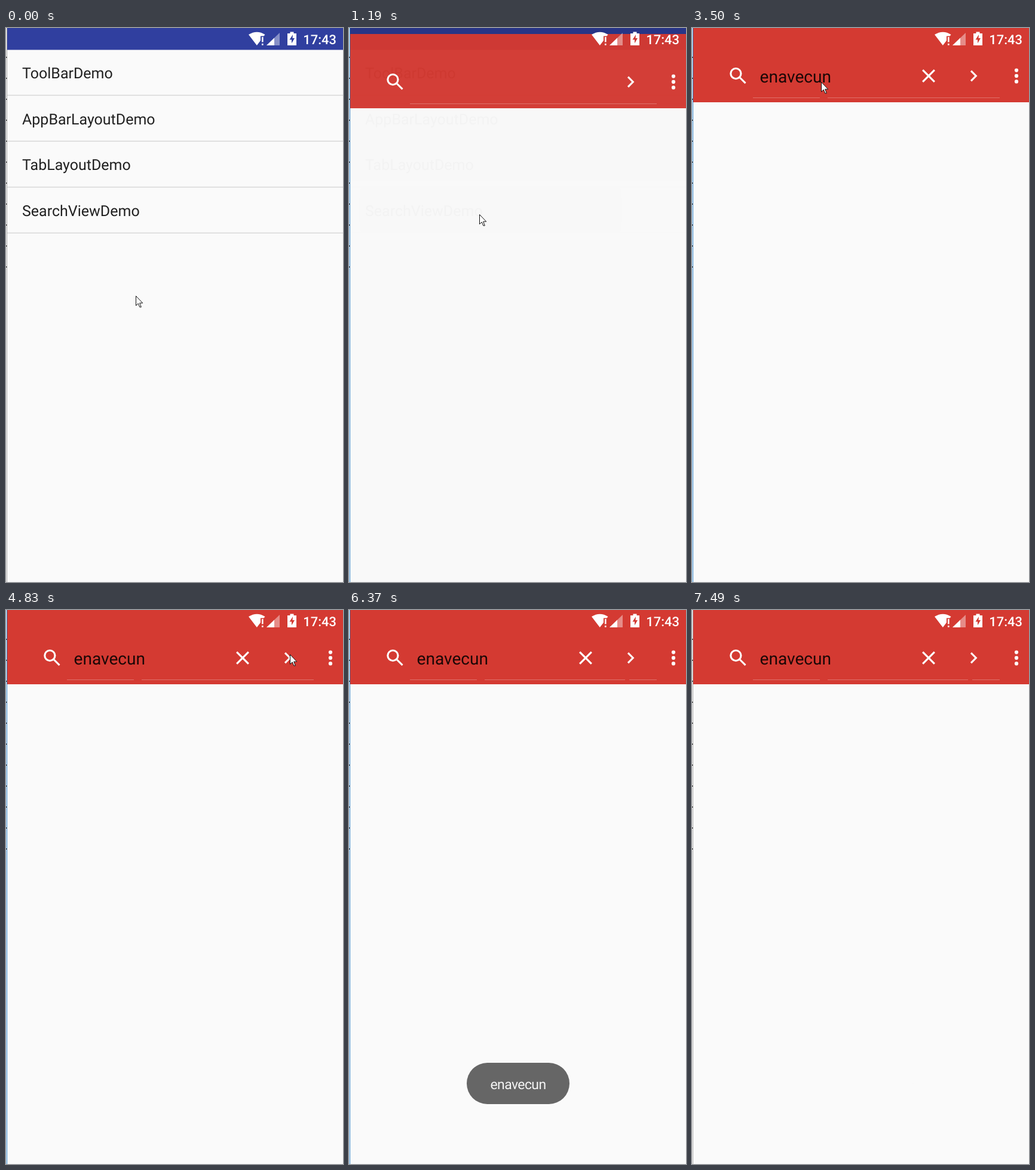
These frames come from a looping animation (564x925 px, 7560 ms). An HTML page:

```html
<!DOCTYPE html>
<html lang="en">
<head>
<meta charset="utf-8">
<title>Search view</title>
<style>
  html, body { margin: 0; width: 100%; height: 100%; overflow: hidden; background: #fafafa; }
  svg { display: block; width: 100%; height: 100%; }
  text { font-family: Roboto, "Noto Sans", sans-serif; text-rendering: geometricPrecision; }
  .row { font-size: 25px; fill: #212121; }
  .query { font-size: 28.1px; fill: #000; fill-opacity: .87; }
  .clock { font-size: 21.9px; font-weight: 500; fill: #fff; }
  .toast { font-size: 23px; letter-spacing: -.6px; fill: #f4f4f4; text-anchor: middle; }
  .icon { fill: none; stroke: #fff; stroke-width: 2; }
  #more { stroke-width: 4; stroke-linecap: round; }
</style>
</head>
<body>
<svg viewBox="0 0 564 925" preserveAspectRatio="none">
  <defs>
    <clipPath id="rowClip"><rect x="2" y="266" width="562" height="76"/></clipPath>
  </defs>

  <g id="menu">
    <rect width="564" height="925" fill="#fafafa"/>
    <rect width="564" height="36.5" fill="#303f9f"/>
    <circle id="ripple" cy="304" clip-path="url(#rowClip)" fill="#000" fill-opacity=".12"/>
    <g id="rows"></g>
    <rect id="dim" width="564" height="925" fill="#000"/>
  </g>

  <g id="search">
    <rect width="564" height="935" fill="#fafafa"/>
    <rect width="564" height="124" fill="#d43a32"/>
    <g id="icons"></g>
    <rect x="102" y="116" width="413" height="1" fill="#df7069"/>
    <rect id="gapLeft" x="214" y="115" width="13" height="3" fill="#d43a32"/>
    <rect id="gapRight" x="462" y="115" width="7" height="3" fill="#d43a32"/>
    <text id="query" class="query" x="113.5" y="91"></text>
  </g>

  <g id="status" fill="#fff">
    <path d="M406 11Q420 2.5 433.5 11L431.5 13.5H426V21L419.8 29Z"/>
    <path d="M428 15h2.6v8.5H428zM428 26h2.6v2.7H428z"/>
    <path d="M436 29 458 8V29Z" fill-opacity=".42"/>
    <path d="M436 29 449 16.6V29Z"/>
    <path fill-rule="evenodd" d="M471 9h4.5V6.5h6V9h4.5V29H471ZM480 11 474.5 19.5H478V25.5L483 17H479.5Z"/>
    <text class="clock" x="497.3" y="26.7">17:43</text>
  </g>

  <g id="toast">
    <rect x="197" y="756" width="172" height="69" rx="34.5" fill="#666"/>
    <text class="toast" id="toastText" x="283" y="800"></text>
  </g>

  <rect width="1" height="925" fill="#fff"/>
  <rect id="edge" x="1" width="1" height="925"/>
  <g id="marks"></g>

  <path id="pointer" d="M.5 .5V16.5L4.2 13 6.8 19H9.3L6.7 12.2H11.7Z" fill="#fff" stroke="#111"/>
</svg>

<script>
  const LOOP = 7560, STEP = 70;
  const WORD = "enavecun";
  const TYPE_START = 2520, TYPE_GAP = 140;
  const TAP = 490, OPEN = 1075, OPENED = 1260, LEAVE = 6370;
  const ROWS = ["ToolBarDemo", "AppBarLayoutDemo", "TabLayoutDemo", "SearchViewDemo"];

  // Pointer moves; sway bends the path sideways in half waves
  const MOVES = [
    { from: 0, to: 420, x: 217, y: 319 },
    { from: 1120, to: 1750, x: 216, y: 90, sway: 6, waves: 2 },
    { from: 4200, to: 4550, x: 484, y: 74 },
    { from: 4690, to: 4830, x: 475, y: 74 },
    { from: 5040, to: 5600, x: 468, y: 87 },
    { from: 5600, to: LEAVE, x: 540, y: 870, sway: -48, waves: 1 }
  ];

  const el = id => document.getElementById(id);
  const show = (id, on) => el(id).setAttribute("visibility", on ? "visible" : "hidden");
  const set = (id, attrs) => {
    for (const key in attrs) el(id).setAttribute(key, attrs[key]);
  };
  const part = (t, from, to) => Math.min(1, Math.max(0, (t - from) / (to - from)));
  const smooth = k => k * k * (3 - 2 * k);

  const icon = (id, x, d) =>
    `<path id="${id}" class="icon" transform="translate(${x} 80) scale(1.563) translate(-12 -12)" d="${d}"/>`;

  el("icons").innerHTML =
    icon("find", 77.3, "M4 9.5a5.5 5.5 0 0 1 11 0a5.5 5.5 0 0 1-11 0zM13.6 13.6 19.8 19.8") +
    icon("clear", 396, "M5.7 5.7 18.3 18.3M18.3 5.7 5.7 18.3") +
    icon("go", 471.2, "M9.3 6.7 14.6 12 9.3 17.3") +
    icon("more", 543, "M12 6h0M12 12h0M12 18h0");

  el("rows").innerHTML = ROWS.map((name, i) => {
    const y = i * 76.65;
    return `<text class="row" x="27" y="${84 + y}">${name}</text>` +
      `<rect x="2" y="${111.6 + y}" width="562" height="1.5" fill="#d8d8d8"/>`;
  }).join("");

  // Slivers of text showing at the left edge
  for (let y = 48; y < 400; y += 35) {
    el("marks").innerHTML += `<rect y="${y}" width="1.5" height="2" fill="#444"/>`;
  }
  el("toastText").textContent = WORD;

  function pointerAt(t) {
    let x = 217, y = 447;
    for (const { from, to, x: toX, y: toY, sway = 0, waves = 0 } of MOVES) {
      const k = smooth(part(t, from, to));
      x += (toX - x) * k + sway * Math.sin(waves * Math.PI * k);
      y += (toY - y) * k;
    }
    return `${Math.round(x)} ${Math.round(y)}`;
  }

  function draw(t) {
    const press = part(t, TAP, OPEN + 115);
    set("ripple", { cx: 217 + 20 * press, r: 220 * press });

    // Search screen slides up while fading in
    const opened = t >= OPENED;
    const slide = opened ? 1 : part(t, OPEN, OPEN + 350);
    const fade = opened ? 1 : part(t, OPEN, OPEN + 200);
    set("search", {
      transform: `translate(0 ${Math.round(74 * (1 - slide) ** 5)})`,
      opacity: 1 - (1 - fade) ** 4
    });
    set("dim", { opacity: .16 * part(t, OPEN, OPEN + 100) });

    const typed = Math.max(0, Math.floor((t - TYPE_START) / TYPE_GAP) + 1);
    el("query").textContent = WORD.slice(0, typed);
    show("clear", typed > 0);
    show("gapLeft", t >= 1610);
    show("gapRight", t >= 5670);

    set("toast", { opacity: part(t, 5040, 5390) * (1 - part(t, 6790, 7280)) });

    const idle = t < TAP + STEP || t >= LOOP - STEP;
    set("edge", { fill: idle ? "#a6a6a6" : "#2a80c8" });

    set("pointer", { transform: `translate(${pointerAt(t)})` });
    show("pointer", t < LEAVE);
  }

  const start = performance.now();
  function tick() {
    const t = (performance.now() - start) % LOOP;
    draw(Math.floor(t / STEP) * STEP);
    requestAnimationFrame(tick);
  }
  tick();
</script>
</body>
</html>
```
